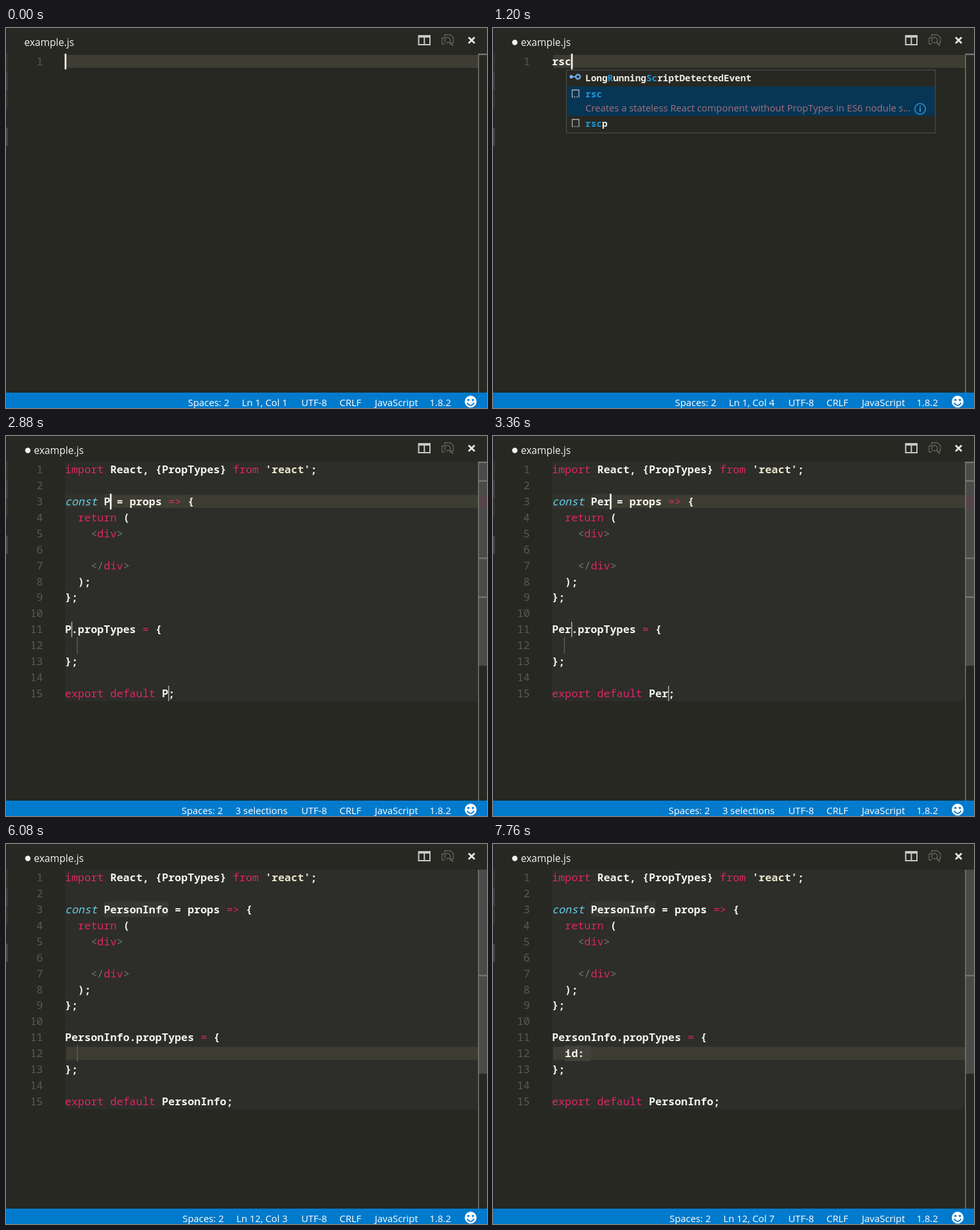
An HTML page with a canvas that plays this animation: 750 px wide and 592 px high, repeating every 8 s.

```html
<!DOCTYPE html>
<html lang="en">
<head>
<meta charset="utf-8">
<title>Snippet typing</title>
<style>
  html, body { margin: 0; width: 100%; height: 100%; overflow: hidden; background: #272822; }
  canvas { display: block; width: 750px; height: 592px; }
</style>
</head>
<body>
<canvas id="stage" width="750" height="592"></canvas>
<script>
const ctx = document.getElementById('stage').getContext('2d');
const LOOP = 8000;
const CELL = 10.07, LEFT = 92, TOP = 40, LINE = 24.93;
const MONO = '"Noto Sans Mono", "DejaVu Sans Mono", monospace';
const UI = '"Open Sans", "Noto Sans", sans-serif';
const COLOR = { w: '#f4f4ee', p: '#de2667', c: '#62cfe6', s: '#e9e5cd', g: '#777872' };

// Time at which each value takes over
const TYPED = [[0, ''], [400, 'r'], [720, 'rs'], [1200, 'rsc'], [1360, 'rscp']];
const NAMES = [[1840, 'componentName'], [2880, 'P'], [3120, 'Pe'], [3360, 'Per'], [3600, 'Pers'],
  [3760, 'Perso'], [4000, 'Person'], [4400, 'PersonI'], [4640, 'PersonIn'], [4720, 'PersonInf'],
  [4880, 'PersonInfo']];
const FIELD = [[5440, ''], [6480, 'i'], [6640, 'id'], [7040, 'id:'], [7200, 'id: ']];
const HIDDEN_CURSOR = [[2400, 2880], [6080, 6480], [7760, 8000]];
const EXPAND = 1840, RENAME = 2880, FILL = 5440;

const STATELESS = 'Creates a stateless React component without PropTypes in ES6 nodule s...';
const LONG = 'LongRunningScriptDetectedEvent';
const LISTS = {
  r: { sel: 0, note: 'Creates a React component class with ES6 module system',
    words: ['rcc', 'rccp', 'rcfc', 'rcjc', 'rsc', 'rscp', 'rwwd', 'Range', 'RangeError',
      'ReadableStream', 'RegExp', 'Request'] },
  rs: { sel: 1, note: STATELESS, words: [LONG, 'rsc', 'rscp', 'RsaKeyGenParams'] },
  rsc: { sel: 1, note: STATELESS, words: [LONG, 'rsc', 'rscp'] },
  rscp: { sel: 1, note: 'Creates a stateless React component with PropTypes in ES6 module s...',
    words: [LONG, 'rscp'] },
  i: { sel: 0, note: 'Creates an import statement',
    words: ['imp', 'imd', 'ime', 'imn', 'IDBCursor', 'IDBDatabase', 'IDBFactory', 'IDBIndex',
      'IDBKeyRange', 'ImageData', 'Infinity', 'Intl'] }
};
const POPUPS = [[0, null], [560, ['r', 102]], [720, ['rs', 112]], [1200, ['rsc', 114]],
  [1280, ['rsc', 123]], [1360, ['rscp', 123]], [1440, ['rscp', 133]], [1840, null],
  [6560, ['i', 122]], [6640, null]];

const at = (steps, t) => steps.reduce((v, [from, value]) => t >= from ? value : v, steps[0][1]);
const lineTop = n => TOP + LINE * (n - 1);
const colX = col => LEFT + CELL * col;

function rect(x, y, w, h, color) {
  ctx.fillStyle = color;
  ctx.fillRect(x, y, w, h);
}

function box(x, y, w, h, color, r = 3) {
  ctx.fillStyle = color;
  ctx.beginPath();
  ctx.roundRect(x, y, w, h, r);
  ctx.fill();
}

function disc(x, y, r, color) {
  ctx.fillStyle = color;
  ctx.beginPath();
  ctx.arc(x, y, r, 0, Math.PI * 2);
  ctx.fill();
}

function ring(x, y, r, color, width) {
  ctx.strokeStyle = color;
  ctx.lineWidth = width;
  ctx.beginPath();
  ctx.arc(x, y, r, 0, Math.PI * 2);
  ctx.stroke();
}

function path(points, color, width) {
  ctx.strokeStyle = color;
  ctx.lineWidth = width;
  ctx.beginPath();
  points.forEach(([x, y], i) => i ? ctx.lineTo(x, y) : ctx.moveTo(x, y));
  ctx.stroke();
}

function text(str, x, y, font, color, align = 'left') {
  ctx.font = font;
  ctx.textAlign = align;
  ctx.fillStyle = color;
  ctx.fillText(str, x, y);
  return ctx.measureText(str).width;
}

// Each line is a list of [colour key, text]
function snippet(name, field) {
  return [
    [['p', 'import '], ['w', 'React, {PropTypes} '], ['p', 'from '], ['s', "'react'"], ['w', ';']],
    [],
    [['c', 'const '], ['w', name + ' = props '], ['p', '=> '], ['w', '{']],
    [['p', '  return '], ['w', '(']],
    [['g', '    <'], ['p', 'div'], ['g', '>']],
    [],
    [['g', '    </'], ['p', 'div'], ['g', '>']],
    [['w', '  );']],
    [['w', '};']],
    [],
    [['w', name + '.propTypes '], ['p', '= '], ['w', '{']],
    [['w', '  ' + field]],
    [['w', '};']],
    [],
    [['p', 'export default '], ['w', name + ';']]
  ];
}

function drawLines(lines) {
  lines.forEach((tokens, i) => {
    const y = lineTop(i + 1) + 18;
    text(String(i + 1), 57.5, y, `16.78px ${MONO}`, '#595a54', 'right');
    let col = 0;
    for (const [key, str] of tokens) {
      const style = key === 'c' ? 'italic 500' : key === 'w' || key === 's' ? '600' : '400';
      text(str, colX(col), y, `${style} 16.78px ${MONO}`, COLOR[key]);
      col += str.length;
    }
  });
}

function cursor(line, col, main) {
  if (main) rect(colX(col) - 0.5, lineTop(line), 2.6, 24.5, '#f8f8f0');
  else rect(colX(col) - 0.2, lineTop(line), 1.4, 24, '#b5b5b0');
}

function band(line, x = 94) {
  rect(x, lineTop(line) + 2, 736 - x, 20, '#3e3d34');
}

function drawExpanded(t, blink) {
  const name = at(NAMES, t), field = t < FILL ? '' : at(FIELD, t);
  const spots = [[3, 6], [11, 0], [15, 15]];
  rect(LEFT, TOP, 644, 373, '#2d2d2a');
  if (t < RENAME) {
    for (const [line, col] of spots)
      box(colX(col), lineTop(line), CELL * name.length + 1, 24, '#4d4c47');
  } else {
    if (t < FILL) {
      rect(LEFT, lineTop(3) + 2, 644, 20, '#32322d');
      band(3, colX(6 + name.length));
    } else {
      band(12);
    }
    box(colX(6), lineTop(3), CELL * name.length, 24, '#373733');
  }
  if (!field) rect(110.5, 313, 1.6, 26.5, '#5a5a54');
  else rect(112, lineTop(12), CELL * field.length, 24, '#42413a');
  drawLines(snippet(name, field));
  if (!blink) return;
  if (t < FILL) spots.forEach(([line, col], i) => cursor(line, col + name.length, i === 0));
  else cursor(12, 2 + field.length, true);
}

function rowIcon(x, y, isSnippet) {
  if (isSnippet) {
    path([[x + 9.5, y + 16], [x + 9.5, y + 5.5], [x + 20, y + 5.5], [x + 20, y + 16]], '#b5b5b5', 1.3);
    ctx.setLineDash([2, 1.6]);
    path([[x + 9, y + 16.5], [x + 21, y + 16.5]], '#b5b5b5', 1.6);
    ctx.setLineDash([]);
  } else {
    path([[x + 8, y + 10], [x + 14, y + 10]], '#6fb4ee', 1.8);
    disc(x + 8, y + 10, 2.7, '#6fb4ee');
    ring(x + 18.5, y + 10, 3.4, '#6fb4ee', 2.2);
  }
}

// Letters of the query light up in order, ignoring case
function drawWord(word, query, x, y) {
  let hit = 0;
  [...word].forEach((ch, i) => {
    const match = hit < query.length && ch.toLowerCase() === query[hit];
    if (match) hit++;
    text(ch, x + i * 8.63, y, `600 14.38px ${MONO}`, match ? '#1e94dc' : '#f0f0ea');
  });
}

function drawPopup([query, x], above) {
  const { words, sel, note } = LISTS[query];
  const h = 2 + (words.length - 1) * 25 + 46;
  const y = above ? 313 - h : 65;
  rect(x, y, 576, h, '#272822');
  ctx.strokeStyle = '#4b4c47';
  ctx.lineWidth = 1.2;
  ctx.strokeRect(x + 0.5, y + 0.5, 575, h);
  let top = y + 1;
  words.forEach((word, i) => {
    const chosen = i === sel;
    if (chosen) {
      rect(x + 1.5, top, 573, 46, '#073655');
      text(note, x + 30, top + 39, `14.83px ${UI}`, '#a3707c');
      ring(x + 552, top + 35, 8.3, '#2c84c4', 1.8);
      rect(x + 551, top + 30, 2, 2, '#3b95d6');
      rect(x + 551, top + 33.5, 2, 6, '#3b95d6');
    }
    rowIcon(x, top, word[0] === word[0].toLowerCase());
    drawWord(word, query, x + 30, top + 17);
    top += chosen ? 46 : 25;
  });
}

function drawHeader(dirty) {
  if (dirty) disc(34, 22.5, 4.2, '#f2f2f2');
  text('example.js', dirty ? 43.5 : 28.5, 28, `15.6px ${UI}`, '#f4f4f4');

  rect(642.5, 11, 19.5, 16, '#c5c8c9');
  rect(644.5, 15, 6.8, 10, '#272822');
  rect(653.3, 15, 6.8, 10, '#272822');

  const dim = '#5f605c';
  path([[684, 15], [684, 10.5], [693, 10.5], [697.5, 15], [697.5, 23], [695, 23]], dim, 1.4);
  path([[684, 25], [680, 25], [680, 15.5], [684, 15.5]], dim, 1.4);
  ring(688.5, 19, 4.3, dim, 1.6);
  path([[691.5, 22], [697, 27.5]], dim, 2.4);

  path([[721.3, 14.5], [730.7, 23.8]], '#e4e6e6', 2.8);
  path([[730.7, 14.5], [721.3, 23.8]], '#e4e6e6', 2.8);
}

function drawEdges(t) {
  rect(0, 0, 3, 568, '#252627');
  rect(0, 40, 3, 28, '#30312d');
  rect(0, 69, 3, 28, '#3c3d40');
  rect(0, 98, 3, 28, '#32332f');
  rect(0, 155, 3, 29, '#434447');

  if (t >= 1920) rect(737, 40, 13, 318, '#4a4a48');
  if (t >= RENAME && t < FILL) rect(738, 92, 12, 21, '#57444a');
  const marks = t < EXPAND ? [41] : t < FILL ? [41, 70, 190.5, 251] : [205];
  for (const y of marks) rect(737, y - 1.2, 13, 2.4, '#747472');
  rect(736, 40, 1.4, 528, '#7b7b79');
}

function statusText(t) {
  if (t < EXPAND) return 'Ln 1, Col ' + (at(TYPED, t).length + 1);
  if (t < RENAME) return '3 selections (39 characters selected)';
  if (t < FILL) return '3 selections';
  return 'Ln 12, Col ' + (at(FIELD, t).length + 3);
}

function drawStatus(t) {
  const label = (str, right) => text(str, right, 588.5, `14.9px ${UI}`, '#ffffff', 'right');
  rect(0, 568, 750, 24, '#007acc');
  label('1.8.2', 694);
  label('JavaScript', 642.5);
  label('CRLF', 554);
  label('UTF-8', 500.5);
  const width = label(statusText(t), 439);
  label('Spaces: 2', 439 - width - 19.5);

  disc(724.5, 582, 9.2, '#ffffff');
  disc(721, 579.5, 1.7, '#007acc');
  disc(728, 579.5, 1.7, '#007acc');
  ctx.strokeStyle = '#007acc';
  ctx.lineWidth = 1.8;
  ctx.beginPath();
  ctx.arc(724.5, 582.5, 5.3, 0.25, Math.PI - 0.25);
  ctx.stroke();
}

function draw(t) {
  const blink = !HIDDEN_CURSOR.some(([from, to]) => t >= from && t < to);
  rect(0, 0, 750, 592, '#272822');
  drawHeader(t >= 400);
  drawEdges(t);
  if (t < EXPAND) {
    const typed = at(TYPED, t);
    band(1);
    drawLines([[['w', typed]]]);
    cursor(1, typed.length, true);
  } else {
    drawExpanded(t, blink);
  }
  const popup = at(POPUPS, t);
  if (popup) drawPopup(popup, t > FILL);
  drawStatus(t);
}

const start = performance.now();
function tick() {
  draw((performance.now() - start) % LOOP);
  requestAnimationFrame(tick);
}
tick();
</script>
</body>
</html>
```
